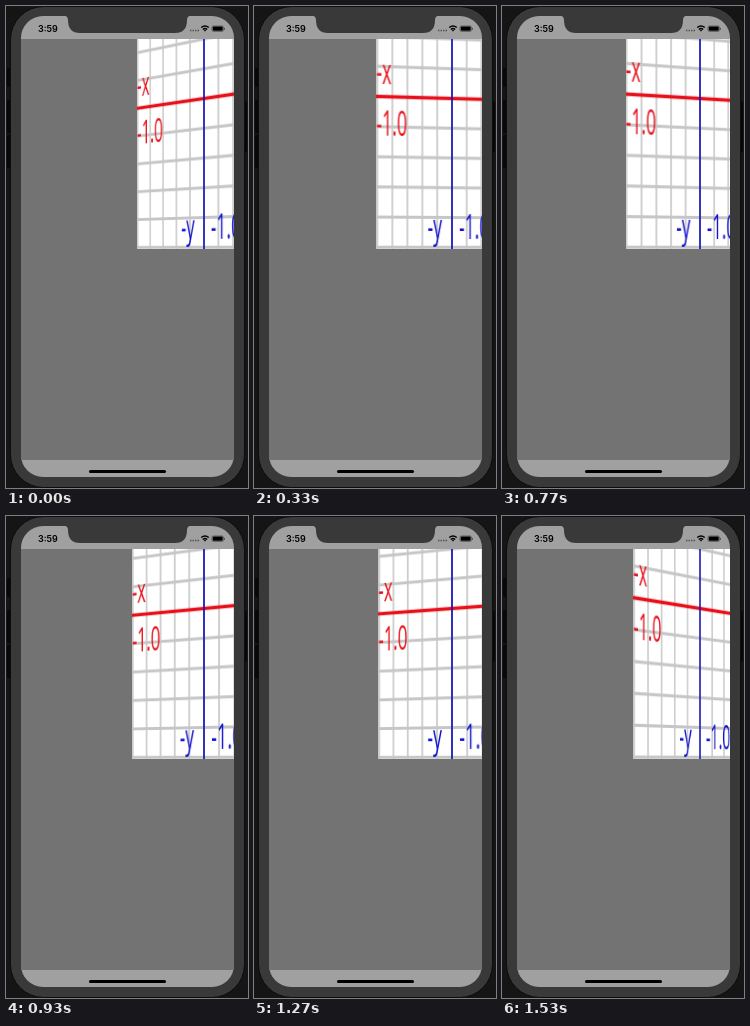
An HTML page for the animation above (1560 ms loop, 242 px wide and 482 px high).

```html
<!DOCTYPE html>
<html lang="en">
<head>
<meta charset="utf-8">
<title>Swinging coordinate grid</title>
<style>
  html, body { margin: 0; width: 100%; height: 100%; overflow: hidden; background: #151515; }
  svg { display: block; }
  #phone { position: absolute; left: 0; top: 0; }
  #view {
    position: absolute; left: 15px; top: 33px; width: 213px; height: 421px;
    overflow: hidden; background: #737373; perspective: 528px;
  }
  #plane { position: absolute; left: 106.5px; top: -90.8px; width: 152px; height: 301px; }
  #plane text { font: 35px "Open Sans", "Noto Sans", sans-serif; }
</style>
</head>
<body>
<svg id="phone" width="242" height="482">
  <g fill="#080808">
    <rect x="1" y="62" width="6" height="19" rx="1.5"/>
    <rect x="1" y="94" width="6" height="33" rx="1.5"/>
    <rect x="1" y="129" width="6" height="33" rx="1.5"/>
    <rect x="235" y="95" width="6" height="51" rx="1.5"/>
  </g>
  <rect x="4.5" y=".5" width="234" height="481" rx="33" fill="#393939" stroke="#0c0c0c"/>
  <rect x="15" y="10" width="213" height="461" rx="22" fill="#a0a0a0"/>
  <path d="M58 9.5Q62 10 62 14Q62 27 74 27H169Q181 27 181 14Q181 10 185 9.5Z" fill="#393939"/>
  <text x="32" y="26" font-family="Inter, sans-serif" font-size="9" font-weight="600">3:59</text>
  <path d="M184 24.5h9" stroke="#555" stroke-width="1.5" stroke-dasharray="1.5 1"/>
  <g fill="none" stroke="#000" stroke-width="1.4">
    <path d="M195.2 21.6Q199 18.2 202.8 21.6M196.8 23.5Q199 21.6 201.2 23.5"/>
    <path d="M198.2 24.2h1.6L199 25.2Z" fill="#000" stroke-width=".7"/>
  </g>
  <rect x="205.9" y="19.9" width="11.6" height="5.6" rx="1.6" fill="none" stroke="#444" stroke-width=".6"/>
  <rect x="206.7" y="20.6" width="10" height="4.2" rx="1"/>
  <rect x="218" y="21.7" width="1" height="2" rx=".5" fill="#444"/>
  <rect x="83" y="464" width="77" height="3" rx="1.5"/>
</svg>
<div id="view">
  <svg id="plane" viewBox="-150 -150 300 300" preserveAspectRatio="none">
    <rect x="-150" y="-150" width="300" height="300" fill="#fff"/>
    <path id="grid" stroke="#c6c6c6" stroke-width="3.2"/>
    <path d="M-150 0H150" stroke="#e8101a" stroke-width="3.4"/>
    <path d="M0-150V150" stroke="#1616b8" stroke-width="3.4"/>
    <g fill="#e8101a">
      <text x="-150" y="-12.5">-x</text>
      <text x="-150" y="38">-1.0</text>
    </g>
    <g fill="#1010d0">
      <text x="-49" y="140.5">-y</text>
      <text x="14.5" y="140.5">-1.0</text>
    </g>
  </svg>
</div>
<script>
const LOOP = 1560, SWING = 520, FIRST_PEAK = 46, MAX_ANGLE = 30, CELL = 29.65;
const plane = document.getElementById('plane');

let lines = '';
for (let i = -5; i <= 5; i++) lines += `M-150 ${i * CELL}H150M${i * CELL} -150V150`;
document.getElementById('grid').setAttribute('d', lines);

// cubic-bezier(.42, 0, .58, 1), solved by bisection
function easeInOut(x) {
  let lo = 0, hi = 1, s;
  for (let i = 0; i < 20; i++) {
    s = (lo + hi) / 2;
    const bx = 3 * s * (1 - s) * (.42 * (1 - s) + .58 * s) + s ** 3;
    if (bx < x) lo = s; else hi = s;
  }
  return s * s * (3 - 2 * s);
}

function draw(now) {
  // 30 steps per second, on a 10 ms clock
  const tick = Math.floor((now % LOOP) / 10);
  const time = Math.floor((3 * tick + 1) / 10) * 100 / 3;
  const phase = (time - FIRST_PEAK) / SWING;
  const swing = Math.floor(phase);
  const sign = swing & 1 ? -1 : 1;
  const angle = sign * MAX_ANGLE * (1 - 2 * easeInOut(phase - swing));
  plane.style.transform = `rotateY(${-angle}deg)`;
  requestAnimationFrame(draw);
}
draw(0);
</script>
</body>
</html>
```
